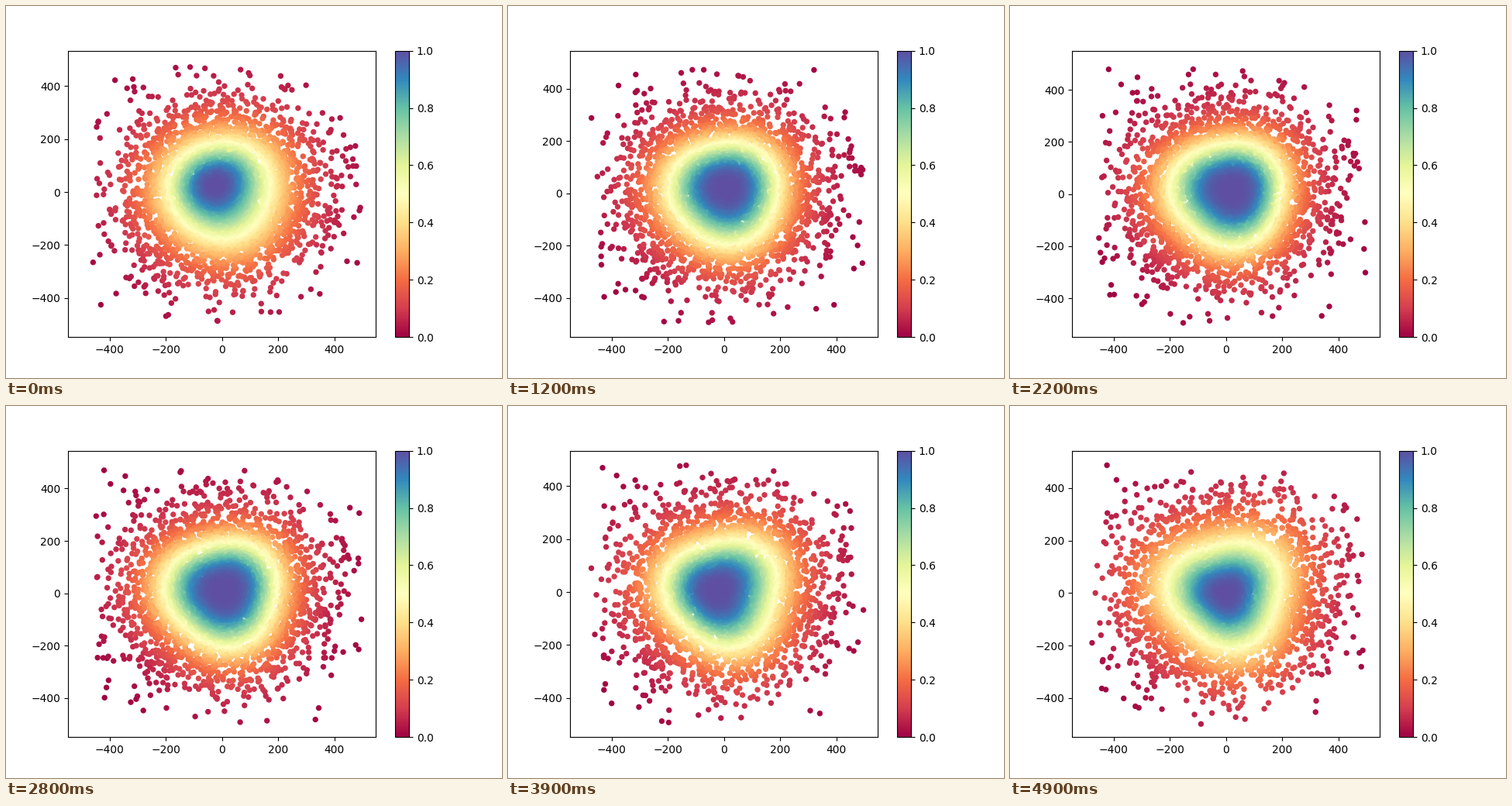
Write a matplotlib script that moves like this. It is 640 by 480 pixels and loops after 5000 ms.

```python
import numpy as np
import matplotlib.pyplot as plt
from matplotlib.animation import FuncAnimation

FRAMES, INTERVAL = 50, 100
COUNT = 4500
CORE_STD, HALO_STD, HALO_SHARE = 150, 260, 0.07
STEP_STD = 7
LEFT, RIGHT, BOTTOM = -499, 497, -499
MARGIN = 0.05

# A dense core inside a thin halo; every particle performs its own random walk.
rng = np.random.default_rng(7)
spread = np.where(rng.random(COUNT) < HALO_SHARE, HALO_STD, CORE_STD)
moves = rng.normal(0, STEP_STD, (FRAMES, COUNT, 2))
moves[0] = rng.normal(size=(COUNT, 2)) * spread[:, None]
walks = moves.cumsum(axis=0)


def density(points, progress, swing):
    """Flat-topped hill, triangular in outline, with a wandering summit."""
    summit = np.array([25 * swing, 28 * (1 - progress)])
    pull = np.exp(-(points ** 2).sum(axis=1) / (2 * 120 ** 2))
    x, y = (points - pull[:, None] * summit).T

    lobes = (0.03 + 0.05 * progress) * np.sin(3 * np.arctan2(y, x) - np.pi / 4)
    half_radius = (184 + 18 * np.sqrt(progress)) * (1 + lobes)
    flatness = 2.6 + 0.8 * np.sin(np.pi * progress)
    value = 1 / (1 + (np.hypot(x, y) / half_radius) ** flatness)
    value -= value.min()
    return value / value.max()


def padded(low, high):
    pad = MARGIN * (high - low)
    return low - pad, high + pad


fig, ax = plt.subplots(figsize=(6.4, 4.8), dpi=100)
dots = ax.scatter([], [], c=[], s=28, linewidths=0, cmap="Spectral",
                  vmin=0, vmax=1)
fig.colorbar(dots, ax=ax)
ax.set_xlim(padded(LEFT, RIGHT))


def update(frame):
    progress = frame / (FRAMES - 1)
    swing = -np.cos(2.5 * np.pi * progress)
    top = 493 + 8 * swing
    x, y = walks[frame].T
    inside = (x > LEFT) & (x < RIGHT) & (y > BOTTOM) & (y < top)
    points = walks[frame][inside]
    value = density(points, progress, swing)
    order = value.argsort()  # densest on top
    dots.set_offsets(points[order])
    dots.set_array(value[order])
    ax.set_ylim(padded(BOTTOM, top))
    return dots,


anim = FuncAnimation(fig, update, frames=FRAMES, interval=INTERVAL,
                     repeat=True, repeat_delay=0)
plt.show()
```
